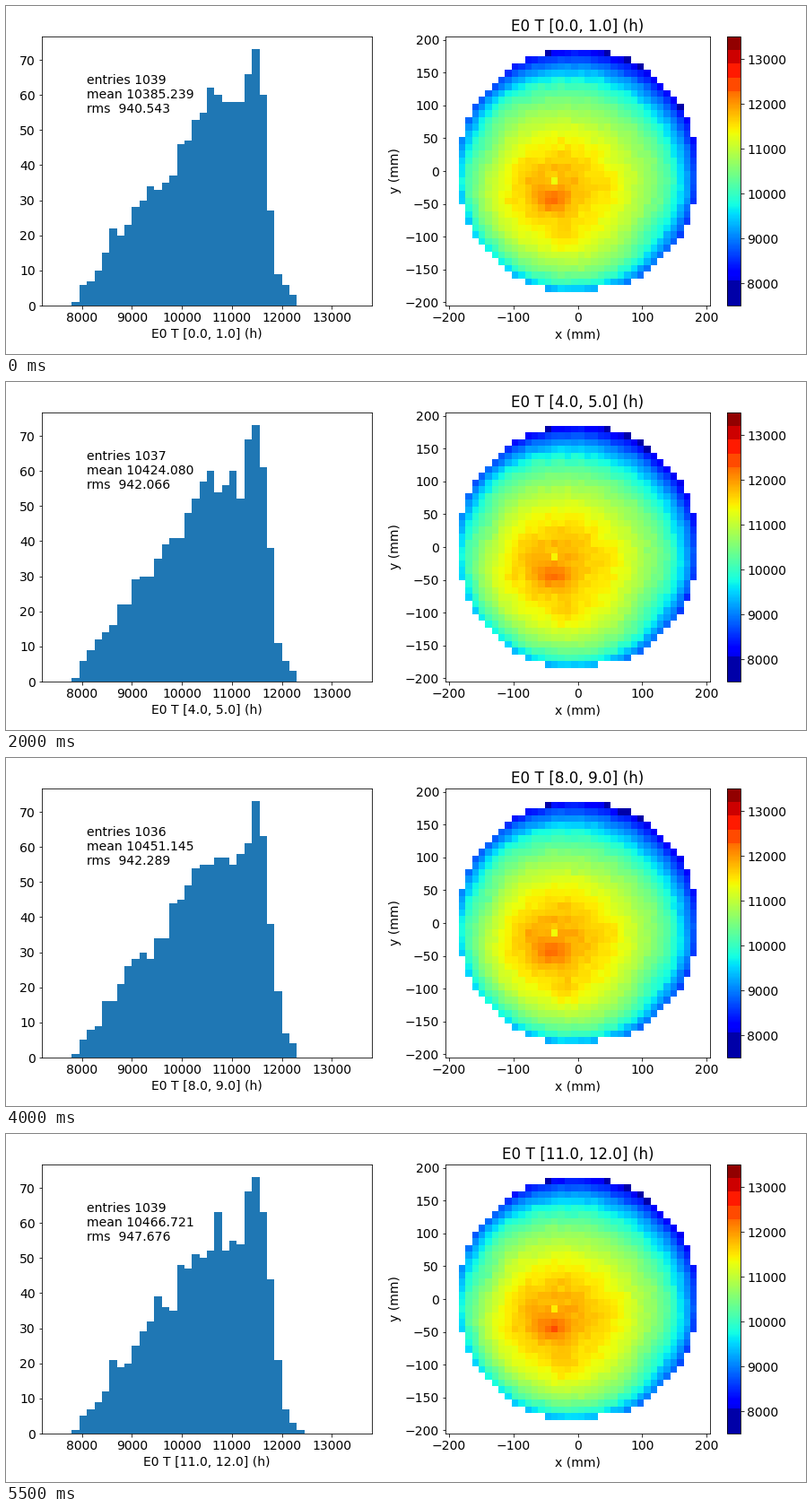
A matplotlib script for the animation above (6 s loop, 892x388 px).

```python
import numpy as np
import matplotlib.pyplot as plt
from matplotlib.animation import FuncAnimation
from matplotlib.colors import ListedColormap
from matplotlib.ticker import MultipleLocator

W, H, DPI = 892, 388, 72
HOURS = 12
LOW, HIGH, BINS = 7500, 13500, 40
EDGES = np.linspace(LOW, HIGH, BINS + 1)
HALF = 205  # mm, half width of the map
CELL = 2 * HALF / BINS

plt.rcParams.update({"font.family": "DejaVu Sans", "font.size": 14})

# Hour: entries, mean, rms; the hours between are interpolated
READINGS = {
    0: (1039, 10385.239, 940.543),
    2: (1037, 10405.568, 941.326),
    4: (1037, 10424.080, 942.066),
    5: (1039, 10429.584, 943.696),
    7: (1038, 10441.816, 945.563),
    9: (1035, 10460.473, 939.016),
    11: (1039, 10466.721, 947.676),
}

# Key points of the histogram's outline: lower bin edge, count
OUTLINE = ((7650, 0), (7800, 1), (8100, 8), (8700, 21), (9600, 37), (10500, 57),
           (11100, 58), (11400, 73), (11550, 63), (11700, 34), (11850, 11),
           (12150, 3), (12300, 0))

# Warm and cool spots on the map: x, y, width, height (mm), gain
SPOTS = (
    (-38, -45, 19, 13, 480),
    (-72, -12, 22, 26, 170),
    (-13, 10, 22, 32, 120),
    (50, -20, 11, 14, 150),
    (-20, -104, 14, 16, 210),
    (-112, -45, 14, 16, 130),
    (-36, -15, 4, 4, -450),
    (-145, 35, 22, 30, -260),
    (110, -90, 28, 28, -260),
)


def readings(hour):
    return [np.interp(hour, list(READINGS), column) for column in zip(*READINGS.values())]


def bin_counts(hour, mean):
    """The outline, moved along with the mean, with seeded counting noise."""
    trend = np.interp(EDGES[:-1] - (mean - 10428), *zip(*OUTLINE))
    noise = np.random.default_rng(40 + hour).normal(0, 0.5, BINS)
    counts = np.rint(trend + noise * np.sqrt(trend)).clip(0, 70)
    counts[trend.argmax()] = 73
    return counts.astype(int)


centres = -HALF + CELL * (np.arange(BINS) + 0.5)
X, Y = np.meshgrid(centres, centres)
inside = np.hypot(X, Y) < 18.25 * CELL
inside[2, 23:25] = False

u, v = X / 184, Y / 184
rho2 = u**2 + v**2
field = -500 * u - 700 * v - 1750 * rho2 - 900 * rho2**4 - 350 * v**2
for sx, sy, sw, sh, gain in SPOTS:
    field += gain * np.exp(-(((X - sx) / sw) ** 2 + ((Y - sy) / sh) ** 2) / 2)
field += np.random.default_rng(5).normal(0, 35, X.shape)


def heat_map(hour, counts):
    """Spread the histogram over the cells, from the coldest to the hottest."""
    noise = np.random.default_rng(100 + hour).normal(0, 25, X.shape)
    order = (field + noise)[inside].argsort()
    share = np.r_[0, counts.cumsum()] / counts.sum()
    values = np.empty(order.size)
    values[order] = np.interp((np.arange(order.size) + 0.5) / order.size, share, EDGES)
    grid = np.ma.masked_all(X.shape)
    grid[inside] = values
    return grid


def banded_jet():
    """Jet with flat steps at both ends."""
    colors = plt.get_cmap("jet")(np.arange(256))
    colors[:24] = colors[9]
    for start in range(204, 256, 13):
        colors[start:start + 13] = colors[start + 8]
    return ListedColormap(colors)


# The small surplus keeps the pixel size from being rounded down
fig = plt.figure(figsize=((W + 1e-6) / DPI, (H + 1e-6) / DPI), dpi=DPI, facecolor="white")


def add_axes(left, right, top=34, bottom=334):
    return fig.add_axes([left / W, 1 - bottom / H, (right - left) / W, (bottom - top) / H])


hist_ax = add_axes(40, 408)
map_ax = add_axes(490, 785)
bar_ax = add_axes(804, 819)

bars = hist_ax.bar(EDGES[:-1], np.zeros(BINS), width=EDGES[1] - EDGES[0],
                   align="edge", color="#1f77b4")
hist_ax.set_xlim(7200, 13800)
hist_ax.xaxis.set_major_locator(MultipleLocator(1000))
hist_ax.yaxis.set_major_locator(MultipleLocator(10))
stats = hist_ax.text(8100, 0.717, "", transform=hist_ax.get_xaxis_transform())

grid_edges = np.linspace(-HALF, HALF, BINS + 1)
mesh = map_ax.pcolormesh(grid_edges, grid_edges, np.ma.masked_all(X.shape),
                         cmap=banded_jet(), vmin=LOW, vmax=HIGH)
map_ax.set(xlim=(-HALF, HALF), ylim=(-HALF, HALF), xlabel="x (mm)", ylabel="y (mm)")
map_ax.xaxis.set_major_locator(MultipleLocator(100))
map_ax.yaxis.set_major_locator(MultipleLocator(50))
fig.colorbar(mesh, cax=bar_ax, ticks=range(8000, 13001, 1000))


def update(hour):
    entries, mean, rms = readings(hour)
    counts = bin_counts(hour, mean)
    for bar, count in zip(bars, counts):
        bar.set_height(count)
    hist_ax.set_ylim(0, 1.05 * counts.max())
    label = f"E0 T [{hour:.1f}, {hour + 1:.1f}] (h)"
    hist_ax.set_xlabel(label)
    map_ax.set_title(label)
    stats.set_text(f"entries {entries:.0f}\nmean {mean:.3f}\nrms  {rms:.3f}")
    mesh.set_array(heat_map(hour, counts))
    return [*bars, stats, mesh]


anim = FuncAnimation(fig, update, frames=HOURS, interval=500, repeat=True, blit=False)
plt.show()
```
